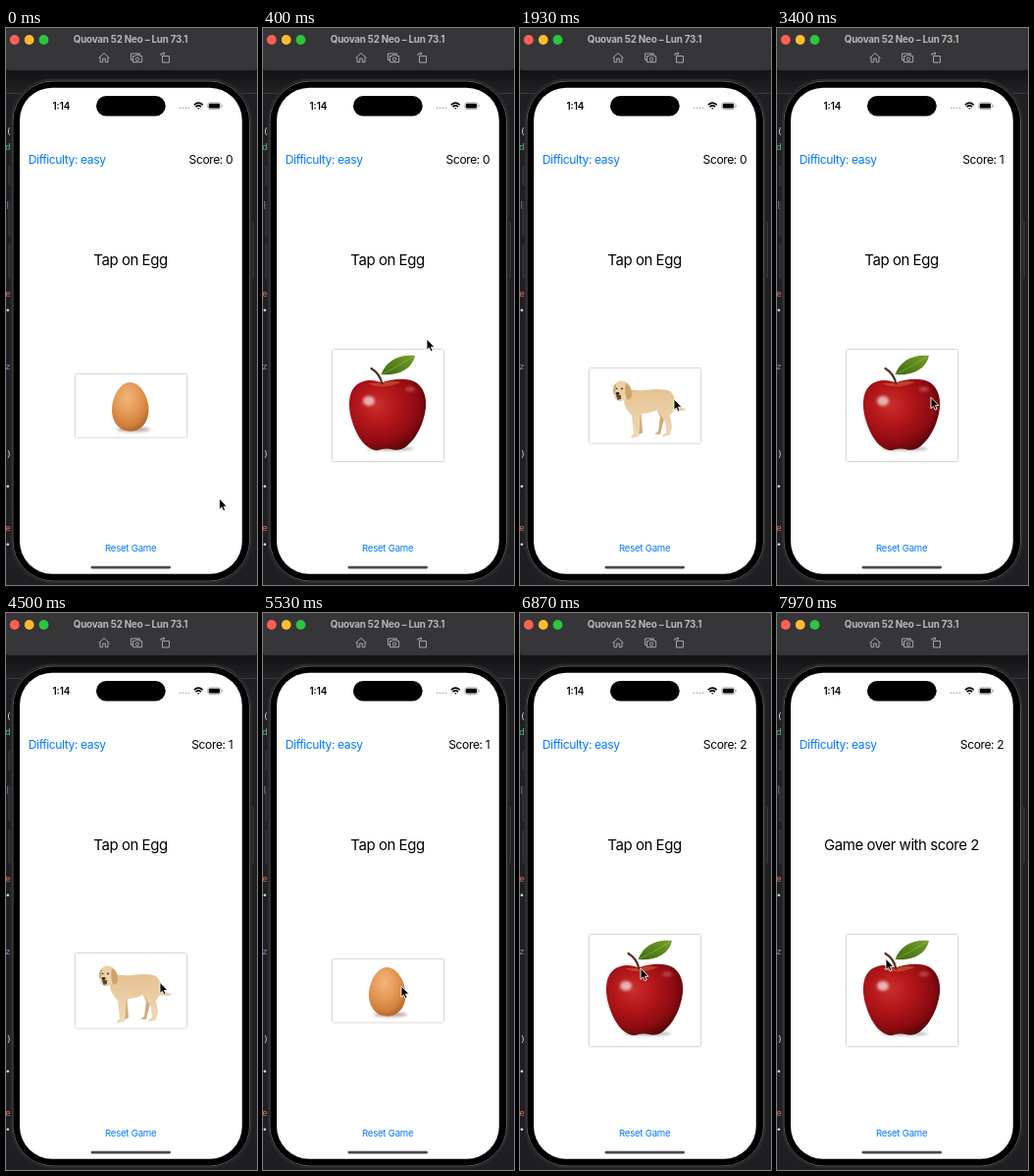
Write an HTML page that moves like this. It is 256 px wide and 566 px high and loops after 8000 ms.

```html
<!DOCTYPE html>
<html lang="en">
<head>
<meta charset="utf-8">
<title>Tap on Egg</title>
<style>
  html, body { margin: 0; width: 100%; height: 100%; overflow: hidden; background: #1f1f23; }
  svg { display: block; width: 100%; height: 100%; }
  text { font-family: Inter, Roboto, sans-serif; }
  .ui { font-size: 12.1px; letter-spacing: -.4px; }
  .prompt { font-size: 15px; letter-spacing: -.46px; }
  .link { fill: #007aff; }
  .code text { font: 9.5px "DejaVu Sans Mono", monospace; fill: #d8d8dc; }
</style>
</head>
<body>
<svg viewBox="0 0 256 566" preserveAspectRatio="none">
  <defs>
    <filter id="glow" x="-10%" y="-10%" width="120%" height="120%">
      <feDropShadow dx="0" dy="0" stdDeviation="1.3" flood-color="#000" flood-opacity=".42"/>
    </filter>
    <filter id="soft" x="-60%" y="-120%" width="220%" height="340%"><feGaussianBlur stdDeviation="1.4"/></filter>
    <linearGradient id="barShade" x1="0" y1="0" x2="0" y2="1">
      <stop offset="0" stop-color="#121214"/><stop offset="1" stop-color="#222225"/>
    </linearGradient>
    <radialGradient id="appleSkin" cx=".36" cy=".36" r=".72">
      <stop offset="0" stop-color="#c8302c"/><stop offset=".35" stop-color="#b5171b"/>
      <stop offset=".75" stop-color="#8c0b11"/><stop offset="1" stop-color="#4c060a"/>
    </radialGradient>
    <linearGradient id="leafSkin" x1="0" y1="1" x2="1" y2="0">
      <stop offset="0" stop-color="#3a6a12"/><stop offset="1" stop-color="#76a026"/>
    </linearGradient>
    <radialGradient id="eggSkin" cx=".42" cy=".32" r=".72">
      <stop offset="0" stop-color="#f3b47a"/><stop offset=".45" stop-color="#e59a57"/>
      <stop offset=".8" stop-color="#d07f3c"/><stop offset="1" stop-color="#a9602a"/>
    </radialGradient>
    <linearGradient id="coat" x1="0" y1="0" x2="0" y2="1">
      <stop offset="0" stop-color="#e6c293"/><stop offset="1" stop-color="#f0d9b8"/>
    </linearGradient>
  </defs>

  <!-- desktop behind the simulator -->
  <rect width="256" height="566" fill="#1f1f23"/>
  <rect y="43" width="256" height="23" fill="url(#barShade)"/>
  <path d="M0 66.5H256" stroke="#38383c"/>
  <g class="code">
    <text x="0" y="108">(</text>
    <text x="-1" y="124" style="fill:#5fb58c">d</text>
    <text x="-1" y="183" style="fill:#75678f">[</text>
    <text x="-1" y="273" style="fill:#ee6e50">e</text>
    <text x="-1" y="290">•</text>
    <text x="-1" y="347" style="fill:#9a78d0">z</text>
    <text x="0" y="436">)</text>
    <text x="-1" y="469">•</text>
    <text x="-1" y="511" style="fill:#ee6e50">e</text>
    <text x="-1" y="528">•</text>
  </g>

  <!-- window bar -->
  <path d="M0 0H256V39Q256 43 252 43H4Q0 43 0 39Z" fill="#363537"/>
  <path d="M0 43.5H256" stroke="#141416"/>
  <circle cx="8.8" cy="12" r="4.9" fill="#ff5f57"/>
  <circle cx="23.7" cy="12" r="4.9" fill="#febc2e"/>
  <circle cx="38.5" cy="12" r="4.9" fill="#28c840"/>
  <text x="127" y="15.2" text-anchor="middle" fill="#b9b8ba" style="font-size:9.8px;font-weight:700;letter-spacing:-.2px">Quovan 52 Neo – Lun 73.1</text>
  <g fill="none" stroke="#b4b3b5" stroke-width=".9" stroke-linejoin="round">
    <path d="M94.5 30.5L100 25.5L105.5 30.5M96 29.5V34.7H98.7V31H101.3V34.7H104V29.5"/>
    <path d="M129 32.5H127.5V26H136.5V27.5M129.5 28.5H131.5L132.5 27.3H135.5L136.5 28.5H138.7V34.7H129.5Z"/>
    <circle cx="134" cy="31.5" r="1.7"/>
    <path d="M159.5 28.5H166.5V35H159.5ZM158 28V26H162M160.5 24.5L162 26L160.5 27.5"/>
  </g>

  <!-- phone -->
  <g fill="#2d2d30" stroke="#47474b" stroke-width=".5">
    <rect x="2.7" y="140" width="4" height="20" rx="1"/>
    <rect x="2.7" y="178" width="4" height="33" rx="1"/>
    <rect x="2.7" y="220" width="4" height="34" rx="1"/>
    <rect x="249" y="197" width="3.5" height="57" rx="1"/>
  </g>
  <rect x="5.5" y="52.5" width="244.500" height="511" rx="42" fill="#000" stroke="#2b2b2e" stroke-width="1.8"/>
  <rect x="7" y="54" width="241.5" height="508" rx="41" stroke="#59595d"/>
  <rect x="14" y="60.7" width="226.8" height="494" rx="33" fill="#fff"/>
  <rect x="92" y="69" width="70.7" height="20.5" rx="10.25"/>
  <text x="56.4" y="82.6" text-anchor="middle" style="font-size:9.8px;font-weight:600">1:14</text>
  <g fill="#b5b5b7">
    <circle cx="177.500" cy="81.3" r=".9"/><circle cx="180.5" cy="81.3" r=".9"/>
    <circle cx="183.5" cy="81.3" r=".9"/><circle cx="186.5" cy="81.3" r=".9"/>
  </g>
  <g fill="none" stroke="#000" stroke-width="1.5">
    <path d="M191.8 78.2Q196.3 74 200.8 78.2M193.5 80.1Q196.3 77.6 199.1 80.1"/>
    <path d="M195 81.3H197.6L196.3 82.7Z" fill="#000" stroke="none"/>
  </g>
  <rect x="205.8" y="75.8" width="13.2" height="6.7" rx="2" fill="none" stroke="#999" stroke-width=".7"/>
  <rect x="206.8" y="76.8" width="11.2" height="4.7" rx="1.2"/>
  <path d="M220.2 78V80.3" stroke="#999" stroke-width=".9"/>

  <text class="ui link" x="22.8" y="137.5">Difficulty: easy</text>
  <text class="ui" id="score" x="231.2" y="137.5" text-anchor="end"></text>
  <text class="prompt" id="prompt" x="127" y="240.6" text-anchor="middle"></text>
  <text class="link" x="127.2" y="531.7" text-anchor="middle" style="font-size:9.6px;letter-spacing:-.23px">Reset Game</text>
  <rect x="86.5" y="546.7" width="81.5" height="2.7" rx="1.35" fill="#4a4a4c"/>

  <!-- cards -->
  <g id="egg">
    <rect x="71" y="352" width="113" height="63.5" fill="#fff" filter="url(#glow)"/>
    <ellipse cx="130" cy="408" rx="17" ry="2.5" fill="#b8a8a2" filter="url(#soft)"/>
    <path d="M126.500 360C137 360 145.5 375 145.5 388C145.5 401 137 409.7 127 409.7C116 409.7 108 401 108 388C108 375 116 360 126.5 360Z" fill="url(#eggSkin)"/>
  </g>
  <g id="apple">
    <rect x="71" y="327" width="113" height="113" fill="#fff" filter="url(#glow)"/>
    <ellipse cx="130" cy="427.5" rx="24" ry="1.8" fill="#aaa" filter="url(#soft)"/>
    <path d="M121 360.5C113 356.500 101 357 94 364C86 372 87 388 91 400C95 413 102 424 110 427.5Q116 430.5 121 428Q127 427 133 428.5Q140 430 147 424.5C157 416 164 402 166 386C167.5 370 160 359.500 149 357.500C140 356 130 357 121 360.5Z" fill="url(#appleSkin)"/>
    <path d="M107 361Q121 368 141 360Q130 357.5 121 361Z" fill="#d98a3c" opacity=".4"/>
    <ellipse cx="108" cy="379" rx="6" ry="5" fill="#fff" opacity=".65" filter="url(#soft)"/>
    <ellipse cx="150" cy="367" rx="5" ry="2.500" fill="#f09a90" opacity=".4" filter="url(#soft)"/>
    <path d="M121.5 361.5Q119 351 110.5 346" fill="none" stroke="#54301d" stroke-width="2.2" stroke-linecap="round"/>
    <path d="M120.5 352C126 337 140 331 155 333C152 347 138 353.5 120.5 352Z" fill="url(#leafSkin)"/>
    <path d="M121 352Q136 345 153 334" fill="none" stroke="#a4c060" stroke-width=".5"/>
  </g>
  <g id="dog">
    <rect x="71" y="346" width="113" height="75.5" fill="#fff" filter="url(#glow)"/>
    <path d="M123 386L125 411L122 413L118 411L116 388ZM138 384L143 395L141 410L137 412.5L143 413L147 397L149 383Z" fill="#d3ab78"/>
    <path d="M108 366Q116 369 128 368Q145 365.5 153 369Q158 373 159 382Q164 387 170 387Q167 390.5 157 388L153 394L155 405L153 413.5L146 415.5L145 414L149 411L148 400L140 388Q132 392 123 392L122 404L121 415L114 417L113 415L116 412L114 394Q106 386 106 378Z" fill="url(#coat)"/>
    <path d="M96 364Q98 358 104 358.5Q110 359 113 365L110 376L104 379Q98 380 96.5 375Z" fill="#ecd0a6"/>
    <path d="M108 361Q114 364 114 373Q113 379 109 377Q106 370 108 361Z" fill="#cfa26c"/>
    <path d="M96.5 362Q94 368 96 373Q98 368 98 363Z" fill="#cfa26c"/>
    <path d="M98 373L103 373L103 377L99.5 378Z" fill="#684238"/>
    <g fill="#30231d"><ellipse cx="99.5" cy="371.5" rx="2" ry="1.4"/><circle cx="98.7" cy="366.5" r=".8"/><circle cx="104" cy="366.5" r=".9"/></g>
  </g>

  <path id="cursor" d="M0 0V11.3L2.5 9L4.2 12.7L6.1 11.9L4.5 8.2H8Z" fill="#000" stroke="#fff" stroke-width=".9"/>
</svg>
<script>
const LOOP = 8000;
const byId = id => document.getElementById(id);
const cards = ["egg", "apple", "dog"];

// Each list holds [start time, value].
const shownCard = [[0, "egg"], [400, "apple"], [1400, "dog"], [2400, "egg"], [3400, "apple"], [4430, "dog"], [5430, "egg"], [6430, "apple"]];
const points = [[0, 0], [2730, 1], [5830, 2]];
const prompts = [[0, "Tap on Egg"], [7130, "Game over with score 2"]];

// Cursor stops: [time, x, y]
const stops = [
  [0, 217.5, 478], [30, 217.5, 478], [400, 167, 316], [730, 158, 373],
  [870, 158, 373], [1130, 157, 377], [2970, 157, 377], [3000, 157, 375.3],
  [4670, 157, 375.3], [5130, 147.5, 377.5], [5300, 147.5, 377.5], [5530, 141, 379],
  [6070, 134, 374], [6130, 134, 374], [6870, 123, 361], [7130, 123, 361],
  [7930, 111, 351.3], [LOOP, 111, 351.3]
];

const valueAt = (steps, t) => steps.findLast(([start]) => start <= t)[1];

function cursorAt(t) {
  const next = stops.findIndex(([time]) => time > t);
  const [t0, x0, y0] = stops[next - 1], [t1, x1, y1] = stops[next];
  const p = (t - t0) / (t1 - t0), eased = p * p * (3 - 2 * p);
  return [x0 + (x1 - x0) * eased, y0 + (y1 - y0) * eased];
}

function draw(now) {
  const t = now % LOOP;
  const current = valueAt(shownCard, t);
  for (const card of cards) byId(card).style.display = card === current ? "" : "none";
  byId("score").textContent = "Score: " + valueAt(points, t);
  byId("prompt").textContent = valueAt(prompts, t);
  byId("cursor").setAttribute("transform", `translate(${cursorAt(t)})`);
}

function tick() {
  draw(performance.now());
  requestAnimationFrame(tick);
}
tick();
</script>
</body>
</html>
```
